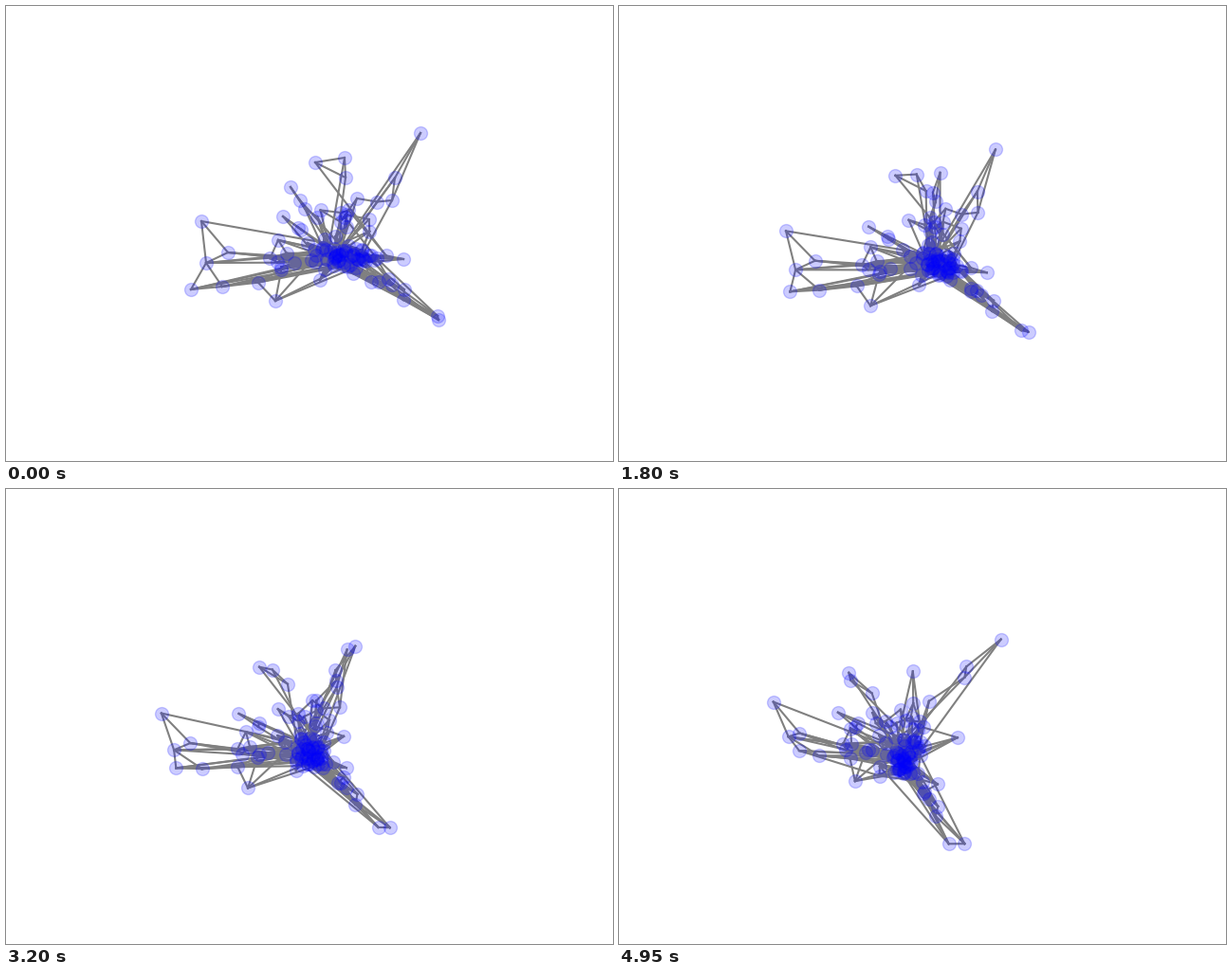
These frames come from a looping animation (640x480 px, 5000 ms). A matplotlib script:

```python
import numpy as np
import matplotlib.pyplot as plt
from matplotlib.animation import FuncAnimation
from matplotlib.collections import LineCollection

W, H, DPI = 640, 480, 100
FRAMES, INTERVAL = 100, 50
CX, CY, DIST = 328, 237, 2300      # screen centre and eye distance, px
AZIM_STEP, ELEV_STEP = np.radians(0.5), np.radians(0.2)

# Key points of the outline: x and y in the opening view, x in the closing one
TIPS = np.array([
    (437, 134, 310), (300, 191, 402), (357, 160, 245), (326, 165, 243),
    (358, 181, 267), (370, 203, 297), (310, 205, 366), (407, 205, 317),
    (292, 222, 231), (206, 227, 163), (234, 260, 190), (211, 271, 178),
    (195, 299, 189), (228, 296, 210), (284, 311, 248), (455, 327, 348),
    (456, 331, 365), (419, 310, 334), (419, 267, 320), (348, 263, 357),
], float)
CORE, CORE_SPREAD, CORE_SIZE = (353, 262, 301), (17, 7, 9), 42
PER_ARM = 2

rng = np.random.default_rng(4)


def scale(depth):
    return DIST / (DIST - depth)


def locate(views):
    """Recover side, depth and height from the two views."""
    x0, y0, x1 = views.T
    turn = AZIM_STEP * (FRAMES - 1)
    c, s = np.cos(turn), np.sin(turn)
    depth = np.zeros_like(x0)
    end_depth = depth
    for _ in range(30):
        side = (x0 - CX) / scale(depth)
        end_side = (x1 - CX) / scale(end_depth)
        depth = (side * c - end_side) / s
        end_depth = depth * c + side * s
    return np.column_stack([side, depth, (CY - y0) / scale(depth)])


def build_nodes():
    """Tips, a few nodes on the arm towards each tip, and a dense core."""
    ends = np.repeat(TIPS, PER_ARM, axis=0)
    reach = rng.uniform(0.15, 0.65, (len(ends), 1))
    arms = CORE + (ends - CORE) * reach + rng.normal(0, 5, ends.shape)
    core = rng.normal(CORE, CORE_SPREAD, (CORE_SIZE, 3))
    return locate(np.vstack([TIPS, arms, core]))


def build_links(nodes):
    """Join each node to its two nearest and to random core nodes."""
    total = len(nodes)
    first_core = total - CORE_SIZE
    links = set()
    for i, node in enumerate(nodes):
        gaps = np.linalg.norm(nodes - node, axis=1)
        near = np.argsort(gaps)[1:3]
        ties = 1 if node[2] > 0 or i >= first_core else 3
        far = rng.integers(first_core, total, ties)
        links |= {(min(i, j), max(i, j)) for j in (*near, *far) if i != j}
    return np.array(sorted(links))


nodes = build_nodes()
links = build_links(nodes)


def project(frame):
    az, el = AZIM_STEP * frame, ELEV_STEP * frame
    side, depth, height = nodes.T
    p = side * np.cos(az) - depth * np.sin(az)
    d = depth * np.cos(az) + side * np.sin(az)
    drop = d * np.sin(el) - height * np.cos(el)
    near = scale(d * np.cos(el) + height * np.sin(el))
    return np.column_stack([CX + p * near, CY + drop * near])


fig = plt.figure(figsize=(W / DPI, H / DPI), dpi=DPI, facecolor="white")
ax = fig.add_axes([0, 0, 1, 1])
ax.set_xlim(0, W)
ax.set_ylim(H, 0)
ax.axis("off")

start = project(0)
edges = LineCollection(start[links], colors="gray", linewidths=1.5,
                       capstyle="projecting", zorder=1)
ax.add_collection(edges)
dots = ax.scatter(start[:, 0], start[:, 1], s=100, c="blue", alpha=0.2,
                  linewidths=1, zorder=2)


def update(frame):
    points = project(frame)
    edges.set_segments(points[links])
    dots.set_offsets(points)
    return edges, dots


anim = FuncAnimation(fig, update, frames=FRAMES, interval=INTERVAL,
                     repeat=True, repeat_delay=0)
plt.show()
```
